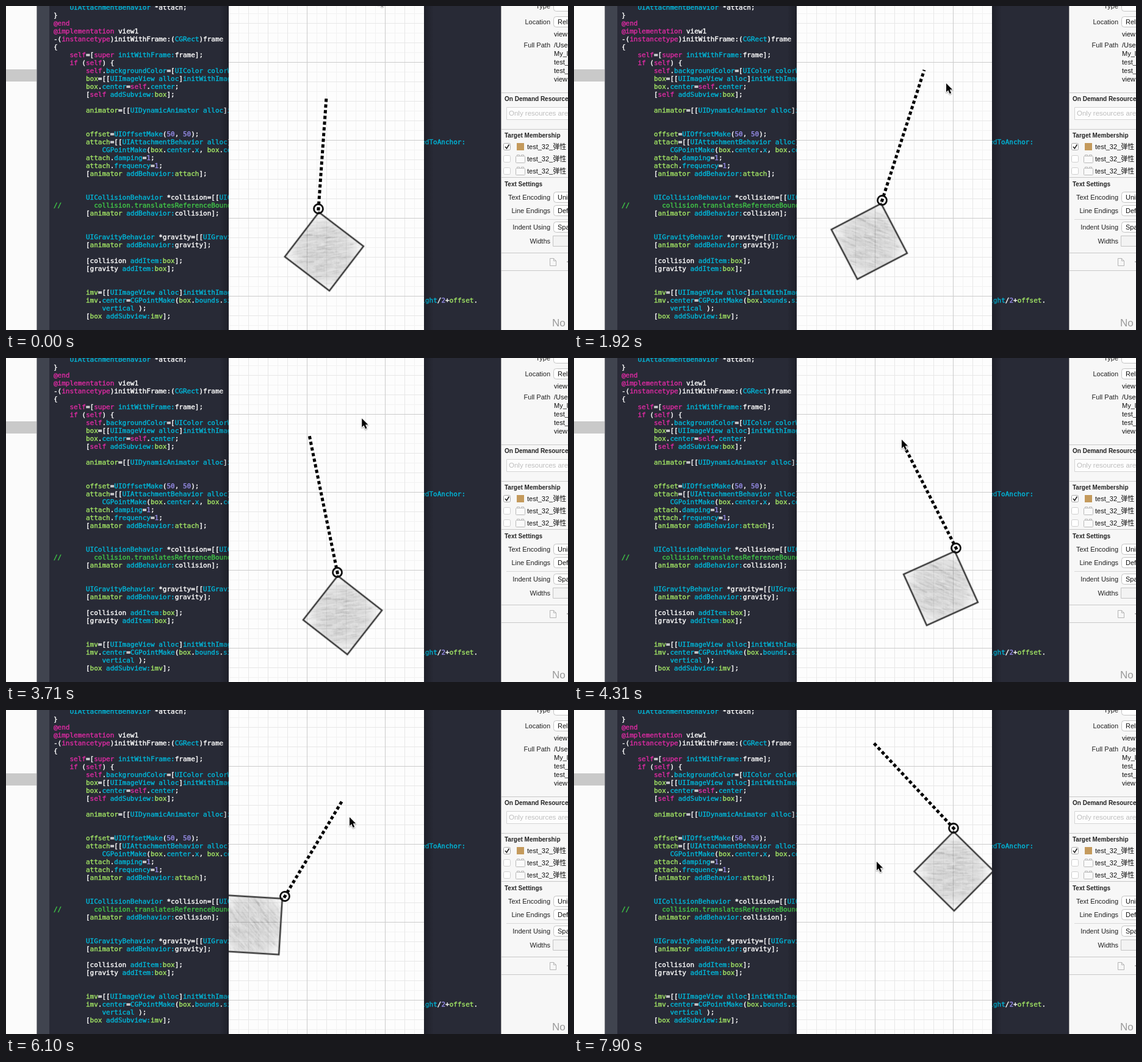
Animation of 921x532 px, one loop 8000 ms. Source, as an HTML page with a canvas:

```html
<!DOCTYPE html>
<html lang="en">
<head>
<meta charset="utf-8">
<title>Spring attachment</title>
<style>
html, body { margin: 0; width: 100%; height: 100%; overflow: hidden; background: #282a36; }
canvas { display: block; width: 921px; height: 532px; }
</style>
</head>
<body>
<canvas id="stage" width="921" height="532"></canvas>
<script>
const W = 921, H = 532, LOOP = 8000, STEPS = 54;
const PHONE = { x: 365, w: 320 };
const MONO = '11px "DejaVu Sans Mono", monospace';
const SANS = '"Liberation Sans", "Noto Sans CJK SC", sans-serif';
const CHAR = 6.622, ROW = 13;
const ctx = document.getElementById('stage').getContext('2d');

function layer(w, h, paint) {
  const c = document.createElement('canvas');
  c.width = w;
  c.height = h;
  paint(c.getContext('2d'));
  return c;
}

function rect(g, x, y, w, h, color) {
  g.fillStyle = color;
  g.fillRect(x, y, w, h);
}

// ---- code editor; "~" marks a word shown in plain white ----
const CODE = `    UIAttachmentBehavior *~attach;
}
@end
@implementation view1
-(instancetype)~initWithFrame:(CGRect)frame
{
    self=[super initWithFrame:frame];
    if (self) {
        self.backgroundColor=[UIColor colorWithPattern
        box=[[UIImageView alloc]initWithImage
        box.center=self.center;
        [self addSubview:box];

        animator=[[UIDynamicAnimator alloc]initWith


        offset=UIOffsetMake(50, 50);
        attach=[[UIAttachmentBehavior alloc]initWith
            CGPointMake(box.center.x, box.center.y)
        attach.damping=1;
        attach.frequency=1;
        [animator addBehavior:attach];


        UICollisionBehavior *collision=[[UICollision
//        collision.translatesReferenceBounds
        [animator addBehavior:collision];


        UIGravityBehavior *gravity=[[UIGravityBehavior
        [animator addBehavior:gravity];

        [collision addItem:box];
        [gravity addItem:box];


        imv=[[UIImageView alloc]initWithImage
        imv.center=CGPointMake(box.bounds.size.width
            vertical );
        [box addSubview:imv];`.split('\n');

function tokenColor(word) {
  if (/^\/\//.test(word)) return '#41c748';
  if (/^(@\w+|self|super|if|instancetype)$/.test(word)) return '#dc2ba2';
  if (/^(box|animator|attach|offset|imv)$/.test(word)) return '#a0e264';
  if (/^\d+$/.test(word)) return '#968ce8';
  if (/^(~.*|collision|gravity|frame|view1|\W+)$/.test(word)) return '#ffffff';
  return '#00b6d8';
}

function codeLine(g, x, row, text) {
  const tokens = text.match(/^\/\/.*|[~@]?\w+:?|[^\w~@]+/g) || [];
  g.lineWidth = .4;
  for (const token of tokens) {
    const word = token.replace('~', '');
    g.fillStyle = g.strokeStyle = tokenColor(token.replace(/:$/, ''));
    g.fillText(word, x, 6 + row * ROW);
    g.strokeText(word, x, 6 + row * ROW);
    x += word.length * CHAR;
  }
}

function paintEditor(g) {
  rect(g, 0, 0, W, H, '#282a36');
  rect(g, 0, 0, 50, H, '#fbfbfb');
  rect(g, 0, 104, 50, 20, '#c9c9c9');
  rect(g, 50, 0, 1, H, '#8b8b90');
  rect(g, 51, 0, 20, H, '#40444f');
  g.font = MONO;
  CODE.forEach((text, row) => codeLine(g, 78, row, text));
  rect(g, PHONE.x, 0, W - PHONE.x, H, '#282a36');
  const tail = (end, row, text) => codeLine(g, end - text.length * CHAR, row, text);
  tail(753, 17, 'attachedToAnchor:');
  tail(773, 37, 'height/2+offset.');
}

// ---- phone view with graph paper ----
function paintPhone(g) {
  const { x, w } = PHONE;
  for (const [edge, out] of [[x, x - 16], [x + w, x + w + 16]]) {
    const shade = g.createLinearGradient(edge, 0, out, 0);
    shade.addColorStop(0, 'rgba(0,0,0,.25)');
    shade.addColorStop(1, 'rgba(0,0,0,0)');
    rect(g, Math.min(edge, out), 0, 16, H, shade);
  }
  rect(g, x, 0, w, H, '#fdfdfd');
  for (const [gap, color] of [[16, '#f2f2f2'], [32, '#e7e7e7'], [128, '#cbcbcb']]) {
    for (let px = 493 % gap; px < x + w; px += gap) if (px > x) rect(g, px, 0, 1, H, color);
    for (let py = 92 % gap; py < H; py += gap) rect(g, x, py, w, 1, color);
  }
}

// ---- inspector ----
function paintInspector(g) {
  const label = (text, x, y, font = '11px', color = '#111', align = 'left') => {
    g.font = `${font} ${SANS}`;
    g.textAlign = align;
    g.fillStyle = color;
    g.fillText(text, x, y + 4);
  };
  const box = (x, y, w, h, fill, r, edge) => {
    g.beginPath();
    g.roundRect(x + .5, y + .5, w, h, r);
    g.fillStyle = fill;
    g.fill();
    g.strokeStyle = edge;
    g.lineWidth = 1;
    g.stroke();
  };
  const name = (text, y) => label(text, 892, y, '11px', '#222', 'right');
  const heading = (text, y) => label(text, 817, y, 'bold 10px', '#222');
  const popup = (text, y, value) => {
    name(text, y);
    box(897, y - 9, 40, 17, '#fff', 4, '#c3c3c3');
    label(value, 904, y);
  };
  const target = (y, checked) => {
    box(815, y - 6, 11, 11, '#fff', 2, checked ? '#a8a8a8' : '#cfcfcf');
    label('test_32_弹性', 854, y);
    if (checked) {
      g.strokeStyle = '#222';
      g.lineWidth = 1.6;
      g.stroke(new Path2D(`M818 ${y}l2.5 3l4-6.5`));
      rect(g, 837, y - 6, 12, 12, '#c49a5c');
    } else {
      box(835, y - 5, 15, 11, '#fafafa', 1, '#b9b9b9');
      for (const x of [837, 844]) box(x, y - 7, 4, 2, '#fafafa', 0, '#b9b9b9');
    }
  };

  rect(g, 811, 0, 110, H, '#f7f7f7');
  rect(g, 811, 0, 1, H, '#a9a9a9');
  for (const y of [142, 202, 281, 405, 434]) rect(g, 812, y, 109, 1, '#c8c8c8');
  rect(g, 820, 350, 101, 1, '#d8d8d8');

  popup('Type', 0, '');
  popup('Location', 26, 'Relative');
  label('view1', 898, 46);
  name('Full Path', 64);
  ['/Users', 'My_li', 'test_3', 'test_3', 'view1'].forEach((s, i) => label(s, 898, 64 + 14 * i));

  heading('On Demand Resources', 152);
  box(820, 166, 120, 20, '#fdfdfd', 0, '#d4d4d4');
  label('Only resources are', 824, 176, '11.5px', '#bdbdbd');
  heading('Target Membership', 212);
  for (let i = 0; i < 3; i++) target(231 + 20 * i, i === 0);

  heading('Text Settings', 292);
  popup('Text Encoding', 314, 'Unicode');
  popup('Line Endings', 336, 'Default');
  popup('Indent Using', 363, 'Spaces');
  name('Widths', 386);
  box(896, 377, 40, 17, '#f3f3f3', 0, '#c3c3c3');

  g.strokeStyle = '#b4b4b4';
  g.stroke(new Path2D('M897.5 414.5h-6v12h10v-8l-4-4v4h4'));
  rect(g, 919, 419, 2, 2, '#b4b4b4');
  label('No', 895, 522, '17px', '#999');
}

// ---- pencil-shaded square, streaks across its diagonal ----
function paintSquare(g) {
  const half = 46, turn = Math.PI / 4;
  let seed = 7;
  const rnd = () => (seed = seed * 16807 % 2147483647) / 2147483647;
  const spread = () => (rnd() + rnd() - 1) * half * 1.3;
  g.translate(50, 50);
  g.save();
  g.beginPath();
  g.rect(-half, -half, half * 2, half * 2);
  g.clip();
  const tone = g.createRadialGradient(0, 0, 10, 0, 0, 62);
  tone.addColorStop(0, 'rgba(0,0,0,.17)');
  tone.addColorStop(.6, 'rgba(0,0,0,.13)');
  tone.addColorStop(1, 'rgba(0,0,0,.02)');
  rect(g, -half, -half, half * 2, half * 2, tone);
  g.rotate(-turn);
  for (let i = 0; i < 500; i++) {
    const color = rnd() < .5 ? 'rgba(0,0,0,.04)' : 'rgba(255,255,255,.12)';
    rect(g, spread() - 6, spread(), 4 + rnd() * 12, 1 + rnd() * 2, color);
  }
  g.restore();
  g.strokeStyle = '#3a3a3a';
  g.lineWidth = 2.6;
  g.strokeRect(-half, -half, half * 2, half * 2);
}

const backdrop = layer(W, H, g => {
  paintEditor(g);
  paintPhone(g);
  paintInspector(g);
});
const square = layer(100, 100, paintSquare);

// ---- motion ----
// Turning points: step, ring x, ring y, swing in degrees, anchor x, anchor y.
const SWINGS = [
  [0, 512, 333, 7.6, 525, 150],
  [6, 486, 346, -9, 525, 150],
  [13, 505, 319, -17.4, 574, 105],
  [21, 460, 392, 34.6, 460, 111],
  [29, 626, 312, -20.7, 540, 142],
  [34, 560, 340, -8, 548, 92],
  [41, 457, 306, -48.5, 551, 149],
  [46, 494, 402, 6, 520, 290],
  [49, 550, 390, 18.2, 491, 54],
  [53, 622, 194, .4, 491, 54]
];
// The cursor drags the anchor; this is how far it strays from it: step, dx, dy.
const STRAY = [
  [0, 85, -166], [3, 195, -55], [6, -208, -10], [13, 36, 22], [21, 175, -42],
  [29, -3, -8], [41, 12, 27], [49, -5, -4], [53, 5, 195]
];

// Monotone cubic through the keys.
function sample(keys, n) {
  let i = 0;
  while (i < keys.length - 2 && keys[i + 1][0] <= n) i++;
  const [a, b] = [keys[i], keys[i + 1]];
  const span = b[0] - a[0], u = (n - a[0]) / span;
  const slope = (j, k) => {
    const [p, q] = [keys[j], keys[j + 1]];
    return p && q ? (q[k] - p[k]) / (q[0] - p[0]) : 0;
  };
  const tangent = (j, k) => {
    const s = slope(j - 1, k), t = slope(j, k);
    return s * t > 0 ? 2 * s * t / (s + t) * span : 0;
  };
  return a.slice(1).map((v, j) => {
    const d = b[j + 1] - v, m0 = tangent(i, j + 1), m1 = tangent(i + 1, j + 1);
    return v + u * (m0 + u * (3 * d - 2 * m0 - m1 + u * (m0 + m1 - 2 * d)));
  });
}

function drawBody(x, y, swing, ax, ay) {
  const a = swing * Math.PI / 180, reach = 50 * Math.SQRT2;
  ctx.save();
  ctx.beginPath();
  ctx.rect(PHONE.x, 0, PHONE.w, H);
  ctx.clip();
  ctx.save();
  ctx.translate(x + reach * Math.sin(a), y + reach * Math.cos(a));
  ctx.rotate(-Math.PI * .75 - a);
  ctx.drawImage(square, -50, -50);
  ctx.restore();

  // The first dash sits in the middle of the ring.
  ctx.translate(x, y);
  ctx.rotate(Math.atan2(ay - y, ax - x));
  ctx.strokeStyle = '#000';
  ctx.lineWidth = 5;
  ctx.setLineDash([5.4, 4]);
  ctx.beginPath();
  ctx.moveTo(-2.7, 0);
  ctx.lineTo(Math.hypot(ax - x, ay - y), 0);
  ctx.stroke();
  ctx.setLineDash([]);
  ctx.lineWidth = 2.8;
  ctx.strokeStyle = '#111';
  ctx.beginPath();
  ctx.arc(0, 0, 7.5, 0, Math.PI * 2);
  ctx.stroke();
  ctx.restore();
}

const ARROW = new Path2D('M0 0V14.2L3.2 11.2L5.7 17L8.2 16L5.7 10.3H10.2Z');
function drawCursor(x, y) {
  ctx.save();
  ctx.translate(x, y);
  ctx.lineJoin = 'round';
  ctx.lineWidth = 2;
  ctx.strokeStyle = '#fff';
  ctx.shadowColor = 'rgba(0,0,0,.4)';
  ctx.shadowBlur = 2;
  ctx.shadowOffsetY = 1;
  ctx.stroke(ARROW);
  ctx.shadowColor = 'transparent';
  ctx.fillStyle = '#000';
  ctx.fill(ARROW);
  ctx.restore();
}

function draw(now) {
  // Steps last about 149 ms; half a step's slack absorbs the uneven frame times.
  const n = Math.min(STEPS - 1, Math.floor((now % LOOP + 20) / 149.2));
  const body = sample(SWINGS, n), [dx, dy] = sample(STRAY, n);
  ctx.drawImage(backdrop, 0, 0);
  drawBody(...body);
  drawCursor(body[3] + dx, body[4] + dy);
  requestAnimationFrame(draw);
}
draw(0);
</script>
</body>
</html>
```
